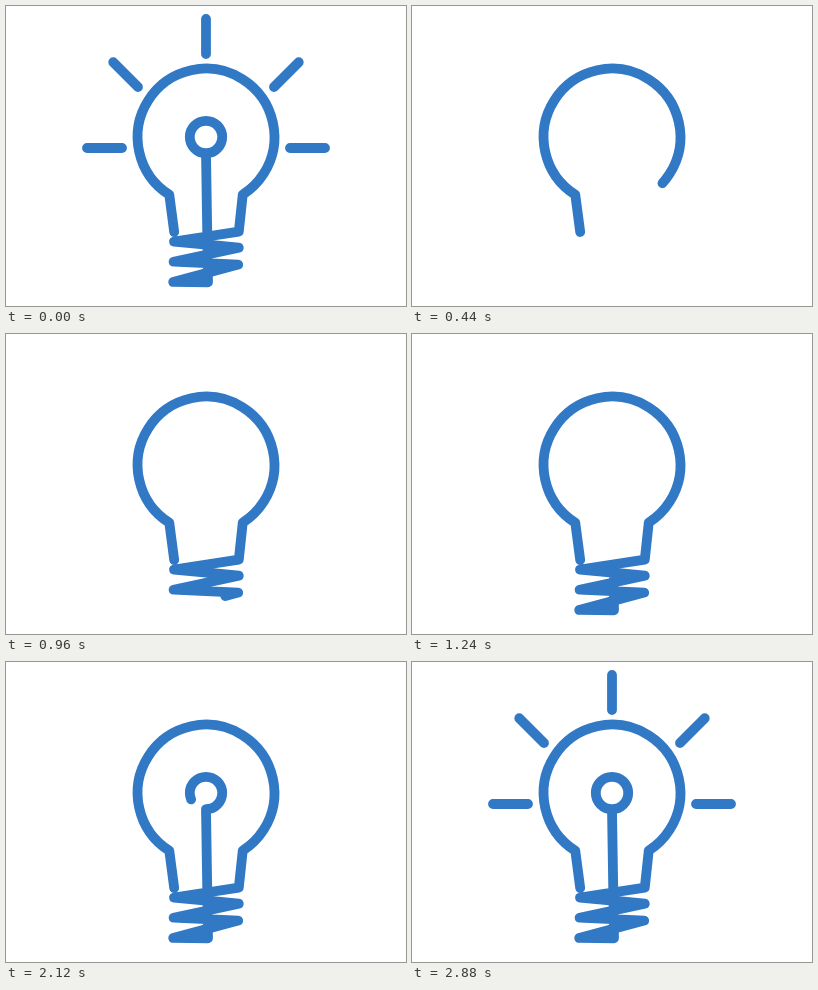
Write an HTML page with a canvas that moves like this. It is 400 by 300 pixels and loops after 4880 ms.

```html
<!DOCTYPE html>
<html lang="en">
<head>
<meta charset="utf-8">
<title>Light bulb</title>
<style>
html, body { margin: 0; width: 100%; height: 100%; overflow: hidden; background: #fff; }
canvas { display: block; width: 400px; height: 300px; }
</style>
</head>
<body>
<canvas id="stage" width="400" height="300"></canvas>
<script>
const ctx = document.getElementById('stage').getContext('2d');
const LOOP = 4880, STEP = 40, START = 40, SPAN = 2880, DONE = 2880;
const RAY_START = 2280, RAY_SPAN = 600, RAY_LENGTH = 35;
const CX = 200, CY = 131, GLASS_R = 68.4, RING_R = 16.2, OPENING = 0.567;
const DOWN = Math.PI / 2, TURN = Math.PI * 2;
const LEAD = 2; // the pen tip runs slightly ahead

const easeOut = p => 1 - Math.pow(1 - Math.min(1, Math.max(0, p)), 3);

// A path that keeps track of its own length.
class Line {
  constructor(x, y) {
    this.path = new Path2D();
    this.path.moveTo(x, y);
    this.x = x;
    this.y = y;
    this.length = 0;
  }
  to(x, y) {
    this.path.lineTo(x, y);
    this.length += Math.hypot(x - this.x, y - this.y);
    this.x = x;
    this.y = y;
  }
  arc(radius, from, sweep) {
    this.to(CX + radius * Math.cos(from), CY + radius * Math.sin(from));
    const end = from + sweep;
    this.path.arc(CX, CY, radius, from, end, sweep < 0);
    this.length += Math.abs(sweep) * radius;
    this.x = CX + radius * Math.cos(end);
    this.y = CY + radius * Math.sin(end);
  }
}

// One continuous line: neck, glass, screw thread, stem, ring.
function makeBulb() {
  const line = new Line(168.2, 226);
  line.arc(GLASS_R, DOWN + OPENING, TURN - OPENING * 2);
  line.to(232.8, 225.6);
  for (let i = 0; i < 3; i++) {
    line.to(168 - i * 0.4, 235.5 + i * 20.2);
    if (i < 2) line.to(232.8 - i * 0.6, 241.7 + i * 16.9);
  }
  line.to(202, 276.3);
  line.arc(RING_R, DOWN, -TURN);
  return line;
}

const bulb = makeBulb();

function drawBulb(amount) {
  if (amount <= 0) return;
  const drawn = bulb.length * amount + LEAD;
  ctx.setLineDash(amount < 1 ? [drawn, bulb.length * 2] : []);
  ctx.stroke(bulb.path);
  ctx.setLineDash([]);
}

// Rays fan out from level to upright, mirrored left and right.
function drawRays(amount) {
  if (amount <= 0) return;
  const starts = [[84, 142], [68, 81], [0, 48]];
  const reach = RAY_LENGTH * amount;
  ctx.beginPath();
  starts.forEach(([x, y], i) => {
    const angle = i * Math.PI / 4;
    for (const side of [-1, 1]) {
      ctx.moveTo(CX + side * x, y);
      ctx.lineTo(CX + side * (x + reach * Math.cos(angle)), y - reach * Math.sin(angle));
    }
  });
  ctx.stroke();
}

function render(time) {
  const t = Math.floor((time % LOOP) / STEP) * STEP;
  const full = t < START || t >= DONE;
  ctx.fillStyle = '#fff';
  ctx.fillRect(0, 0, 400, 300);
  ctx.strokeStyle = '#3178c5';
  ctx.lineWidth = 9.8;
  ctx.lineCap = ctx.lineJoin = 'round';
  drawBulb(full ? 1 : easeOut((t - START) / SPAN));
  drawRays(full ? 1 : easeOut((t - RAY_START) / RAY_SPAN));
}

const begin = performance.now();
function tick() {
  render(performance.now() - begin);
  requestAnimationFrame(tick);
}
tick();
</script>
</body>
</html>
```
